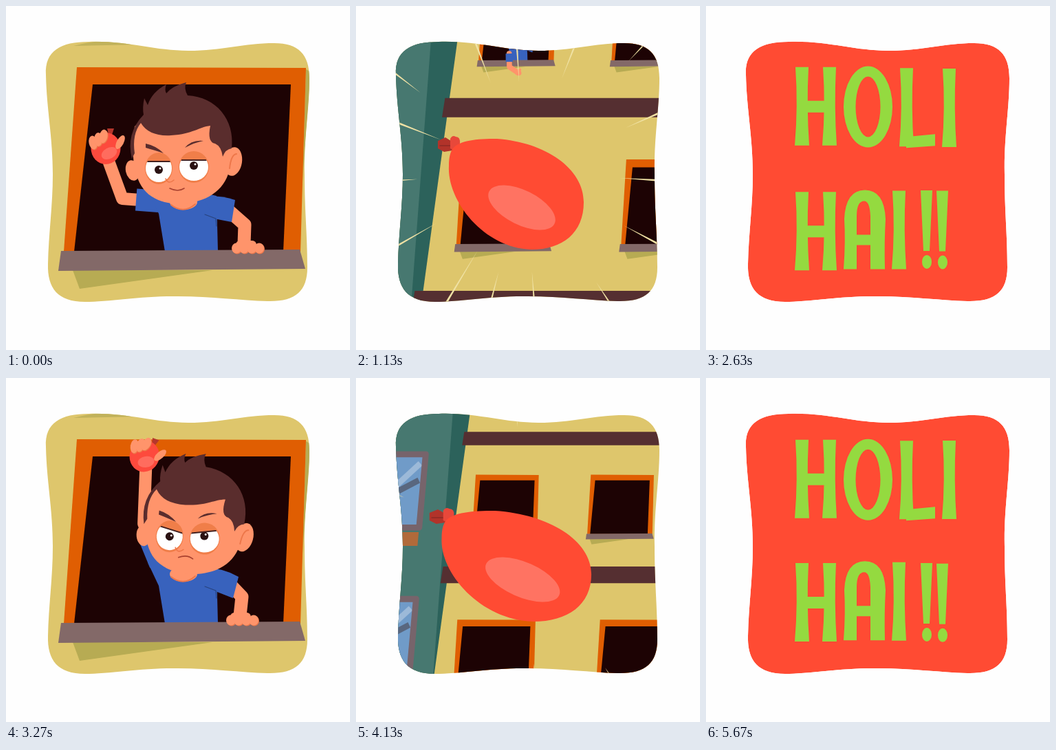
Animation of 500x500 px, one loop 5730 ms. Source, as an HTML page with a canvas:

```html
<!DOCTYPE html>
<html lang="en">
<head>
<meta charset="utf-8">
<title>Holi Hai!!</title>
<style>
html, body { margin: 0; width: 100%; height: 100%; overflow: hidden; background: #fefefe; }
canvas { display: block; }
</style>
</head>
<body>
<canvas id="stage" width="500" height="500" role="img" aria-label="HOLI HAI !!"></canvas>
<script>
const ctx = document.getElementById('stage').getContext('2d');
const CYCLE = 2865, THROW = 570, FALL = 700, BURST = 1420, TITLE = 1580;
const SKIN = '#ff946b', HAIR = '#5a2d2d', SHIRT = '#3862bd', RED = '#ff4b33', WALL = '#dec66c',
  SHADE = '#b7ab53', ORANGE = '#e05e02', DARK = '#1d0304', SILL = '#836968', FOLD = '#ed774a';

const card = new Path2D('M58 100C56 65 80 52 120 52C175 50 215 65 265 65C315 65 345 54 390 54C425 54 441 70 441 105' +
  'C441 150 433 190 434 245C434 300 438 330 438 380C438 415 420 430 380 429C340 428 300 422 250 422' +
  'C200 421 150 430 115 430C75 430 60 410 61 375C62 330 68 290 68 245C68 190 59 150 58 100Z');

const clamp = x => Math.max(0, Math.min(1, x));
const part = (t, from, to) => clamp((t - from) / (to - from));
const mix = (a, b, k) => a + (b - a) * k;
const mixPt = (a, b, k) => a.map((v, i) => mix(v, b[i], k));
const smooth = x => x * x * (3 - 2 * x);
const backOut = x => 1 + 2.4 * (x - 1) ** 3 + 1.4 * (x - 1) ** 2;
const random = seed => Math.abs(Math.sin(seed * 127.1 + 3) * 43758.5) % 1;

function fill(color, d) {
  ctx.fillStyle = color;
  ctx.fill(d instanceof Path2D ? d : new Path2D(d));
}
const poly = (color, pts) => fill(color, 'M' + pts + 'Z');
function oval(color, x, y, rx, ry = rx, rot = 0) {
  ctx.fillStyle = color;
  ctx.beginPath();
  ctx.ellipse(x, y, rx, ry, rot, 0, 7);
  ctx.fill();
}
function line(color, width, d, cap = 'round') {
  ctx.strokeStyle = color;
  ctx.lineWidth = width;
  ctx.lineCap = cap;
  ctx.lineJoin = 'round';
  ctx.stroke(new Path2D(d));
}
function group(draw) {
  ctx.save();
  draw();
  ctx.restore();
}
function scaleAt(x, y, sx, sy = sx) {
  ctx.translate(x, y);
  ctx.scale(sx, sy);
  ctx.translate(-x, -y);
}

// Building: every floor is the boy's floor scaled about one vanishing point.
const VX = 508, VY = -3145;
const ratio = n => 1.24 ** n;

function windowFrame() {
  poly(ORANGE, '103,89 436,90 428,357 84,357');
  poly(DARK, '126,114 414,114 403,357 99,357');
}
function windowSill() {
  poly(SHADE, '97,384 300,384 107,411');
  poly(SILL, '80,356 427,354 435,382 76,385');
}
function band(n) {
  const at = (m, x) => `${VX + x * ratio(m)},${VY + 3499 * ratio(m)} `;
  const top = n + .226, bottom = n + .336;
  poly('#552f31', at(top, -550) + at(top, 2500) + at(bottom, 2500) + at(bottom, -550));
}
function neighbour() {
  poly('#2c625b', '-3000,-200 51,-200 -798,6000 -3000,6000');
  poly('#477870', '-3000,-200 -99,-200 -281,2228 -798,6000 -3000,6000');
  for (let i = 0; i < 4; i++) group(() => {
    ctx.translate(-320 - 63 * i, 655 + 948 * i);
    ctx.transform(1, 0, -.09, 1, 0, 0);
    ctx.fillStyle = '#709bc8';
    ctx.fillRect(-240, 20, 240, 480);
    line('#9cb9d8', 40, 'M-200 250L-30 80', 'butt');
    line('#59677f', 40, 'M-230 300L-30 190', 'butt');
    line('#77646b', 40, 'M-240 20H0V500H-240', 'butt');
    ctx.fillStyle = '#b16a3a';
    ctx.fillRect(-240, 530, 240, 90);
  });
}

function eye(side, k) {
  const rx = 20 + side;
  ctx.translate(247.5 + 25.5 * side, 235 - side);
  oval('#f07e49', 0, 0, rx + 1, 23);
  ctx.beginPath();
  ctx.ellipse(0, 0, rx, 20, 0, 0, 7);
  ctx.clip();
  ctx.rotate(-.2 * side * k);
  ctx.fillStyle = '#fff';
  ctx.fillRect(-30, -10, 60, 60);
  oval('#2a1213', 0, -2 * side - 2 * k, 6);
  oval('#fff', 2, -2 * side - 2 * k - 2, 1.5);
  line('#43201f', 2, 'M-30 -10H30');
}

function head(k, h) {
  ctx.translate(mix(12 * k, -22, h), mix(-3 * k, -6, h));
  ctx.translate(250, 270);
  ctx.rotate(mix(.105 * k, -.2, h));
  ctx.translate(-250, -270);
  oval(SKIN, 184, 239, 10, 15, -.2);
  oval(SKIN, 330, 226, 13, 21, .15);
  fill(SKIN, 'M187 175C180 225 188 262 212 277C235 292 270 290 295 277C322 262 332 235 326 190L290 150L210 155Z');
  line(FOLD, 2, 'M325 236Q327 216 335 215');
  fill(HAIR, 'M183 222Q174 185 200 158Q198 148 201 134L206 144Q212 125 233 114Q230 122 233 127Q242 116 262 111' +
    'Q258 120 264 130C305 132 333 165 328 207Q319 208 315 219Q313 204 304 200Q292 198 297 174' +
    'C280 176 272 186 240 188Q208 190 196 170Q183 186 187 214Z');
  for (const side of [-1, 1]) group(() => eye(side, k));
  fill(HAIR, 'M203 200Q218 203 229 214Q214 209 203 206Z');
  fill(HAIR, 'M260 206Q270 194 287 196Q275 198 260 206Z');
  line(FOLD, 1.6, 'M232 251Q236 260 244 253');
  line('#a8412f', 1.6, `M238 265Q250 ${mix(271, 259, k)} 259 265`);
}

function hand(x, y, k, held) {
  ctx.translate(x, y);
  ctx.rotate(.35 * k);
  if (held) {
    poly('#b5362c', '2,-29 12,-29 9,-20 4,-20');
    oval('#fd4a3d', 0, 0, 21.5, 23);
    oval('#ff6c5e', 5, 7, 12, 8, -.5);
  }
  for (let i = -1; i < 2; i++) {
    oval(FOLD, 7.5 * i - 10, -4.5 * i - 12, 6, 10, .2 * i);
    oval(SKIN, 7.5 * i - 11, -4.5 * i - 13, 6, 10, .2 * i);
  }
  oval(SKIN, 21, -9, 5, 11, .5);
}

const REST = { shoulder: [222, 284], elbow: [169, 280], hand: [150, 228] };
const RAISED = { shoulder: [224, 270], elbow: [200, 212], hand: [203, 132] };
const THROWN = { shoulder: [224, 325], elbow: [225, 386], hand: [264, 412] };

function throwArm(k, h) {
  const joint = name => mixPt(mixPt(REST[name], RAISED[name], k), THROWN[name], h);
  const s = joint('shoulder'), e = joint('elbow'), p = joint('hand');
  const swing = Math.sin(Math.PI * h);
  p[0] -= 18 * Math.sin(Math.PI * clamp(k)) + 110 * swing;
  e[0] -= 40 * swing;
  line(SKIN, mix(18, 24, h), `M${s}L${e}L${p}`);
  line(SHIRT, 32, `M${s}L${mixPt(s, e, .62)}`, 'butt');
  if (h < .6) group(() => hand(p[0] - 5 + 3 * k, p[1] - 21 + 3 * k, k, h < .5));
  else {
    oval(SKIN, p[0], p[1], 17, 13, .4);
    oval(SKIN, p[0] + 8, p[1] - 9, 6, 11, .3);
  }
}

function boy(k, h) {
  if (h === 0) throwArm(k, h);
  const reach = 90 * h;
  poly(SHIRT, '206,268 240,255 280,270 306,276 308,357 231,357 222,302');
  line(SKIN, 19, `M322 296L${347 - 4 * k} ${318 - reach}L${346 - 6 * k} ${346 - reach}`);
  fill(SHIRT, `M286 276Q315 275 ${333 + 5 * k} ${282 + 7 * k}L${328 + 2 * k} ${314 + 6 * k}L302 309Z`);
  line('#27437f', 1.2, 'M289 303L305 309L306 320');
  oval(SKIN, 258, 285, 20, 11);
  line(FOLD, 2, 'M240 289Q258 303 275 288');
  group(() => head(k, h));
  windowSill();
  group(() => {
    ctx.translate(-8 * k, -reach);
    for (let x = 335; x < 372; x += 11) {
      oval(FOLD, x + 1, 353, 7, 7.5);
      oval(SKIN, x, 352, 7, 7.5);
    }
    line(SKIN, 12, 'M340 347H358');
  });
  if (h > 0) throwArm(k, h);
}

function building(t) {
  const wind = part(t, 30, 430), k = backOut(wind) * smooth(clamp(wind * 2));
  const h = part(t, THROW, FALL) ** 1.5;
  scaleAt(222, -50, Math.exp(-.00266 * Math.max(0, t - FALL)));
  ctx.fillStyle = WALL;
  ctx.fillRect(-3000, -300, 8000, 9000);
  fill('#c1b25b', 'M98 58Q150 44 197 56Z');
  poly(SHADE, '436,92 443,96 431,255');
  neighbour();
  for (let n = -1; n < 5; n++) {
    band(n);
    for (let col = 0; col < 3; col++) group(() => {
      const home = n === 0 && col === 0;
      scaleAt(VX, VY, ratio(n));
      ctx.translate(608 * col, 0);
      group(() => {
        scaleAt(0, 356, 1, home ? 1 : 1.17);
        windowFrame();
      });
      if (home) boy(k, h);
      else windowSill();
    });
  }
}

function streaks(t) {
  const count = 15;
  for (let i = 0; i < count; i++) group(() => {
    const a = (i + .7 * random(i)) * 2 * Math.PI / count;
    const far = 205 / Math.max(Math.abs(Math.cos(a)), Math.abs(Math.sin(a)));
    const len = .5 + .5 * Math.cos((t - 1130) * (.01 + .014 * random(i + 50)));
    ctx.translate(245, 242);
    ctx.rotate(a);
    poly('#f0e2a5', `${far * (1 - len * mix(.2, .45, random(i + 90)))},0 ${far},1.8 ${far},-1.8`);
  });
}

function balloon(t) {
  const fly = smooth(part(t, 625, 900)), burst = part(t, BURST, TITLE) ** 2;
  const size = mix(.2, 1, fly) + 5 * burst;
  const wobble = fly * .055 * (1 - Math.cos((t - 1130) * Math.PI / 135));
  ctx.translate(mix(95, 230, fly), mix(330, 274, fly));
  ctx.scale(size * (1 + wobble), size);
  ctx.translate(-230, -274);
  poly('#b2332a', '119,196 130,191 141,198 140,210 128,212 119,207');
  line('#8e2924', 1.5, 'M122 203L138 203');
  fill('#e8483a', 'M137 193Q140 187 145 190Q152 190 151 200L145 211L137 207Z');
  fill(RED, 'M140 208C150 195 175 193 205 193C275 198 331 236 331 285C331 330 300 354 255 354' +
    'C186 352 132 283 135 232C135 220 137 213 140 208Z');
  oval('#ff7362', 241, 293, 53, 25, .46);
}

// Lettering: hand-cut glyphs built from flared stems, set by advance width.
const stem = x => `M${x} 2h19q-3 57 1 114h-21q5 -57 1 -114Z`;
const ellipse = (x, y, rx, ry, sweep = 1) =>
  `M${x - rx} ${y}a${rx} ${ry} 0 1 ${sweep} ${2 * rx} 0a${rx} ${ry} 0 1 ${sweep} ${-2 * rx} 0Z`;
const GLYPHS = {
  H: [61, stem(1) + stem(41) + 'M16 51h28v17h-28Z'],
  O: [71, ellipse(35.5, 59, 35.5, 59) + ellipse(35.5, 59, 18, 44, 0)],
  L: [53, stem(1) + 'M10 102L52 98V115L10 118Z'],
  I: [20, stem(0)],
  A: [61, 'M0 115Q3 75 1 42Q3 0 31 0Q59 0 61 42Q59 75 60 115H39V80H19V115ZM19 65H39V38Q38 16 30 16Q19 16 19 38Z'],
  '!': [13, 'M-2 2h17l-4 88h-9Z' + ellipse(7, 106, 7, 10)],
  ' ': [3, '']
};
const letters = ['HOLI', 'HAI !!'].flatMap((word, row) => {
  let x = 129;
  return [...word].map(char => {
    const [width, d] = GLYPHS[char];
    const letter = { x, y: 88 + 179 * row, width, shape: new Path2D(d) };
    x += width + 10;
    return letter;
  });
});

function lettering(t) {
  letters.forEach(({ x, y, width, shape }, i) => group(() => {
    const start = TITLE + i * 12, pop = part(t, start, start + 120);
    if (!pop) return;
    ctx.translate(x, y + 1.2 * Math.sin(t / 150 + i * .8));
    scaleAt(width / 2, 58, backOut(pop));
    fill('#94da40', shape);
  }));
}

function frame(now) {
  const t = now % CYCLE;
  ctx.fillStyle = '#fefefe';
  ctx.fillRect(0, 0, 500, 500);
  group(() => {
    ctx.clip(card);
    if (t < TITLE) {
      group(() => building(t));
      if (t > 800) streaks(t);
      if (t > 625) group(() => balloon(t));
    } else {
      fill(RED, card);
      lettering(t);
    }
  });
  requestAnimationFrame(() => frame(performance.now() - begin));
}
const begin = performance.now();
frame(0);
</script>
</body>
</html>
```
